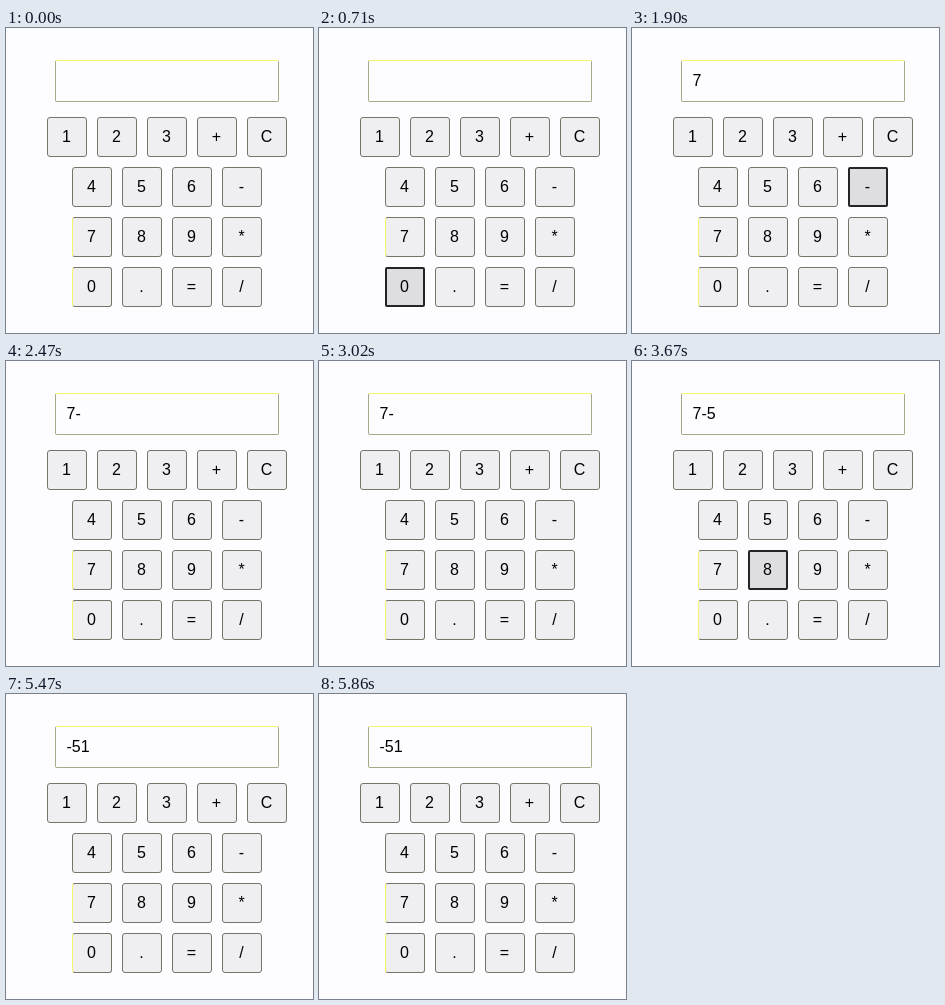
Animation, 307 px wide and 305 px high, one loop 5.98 s. Source, as an HTML page:

```html
<!DOCTYPE html>
<html lang="en">
<head>
<meta charset="utf-8">
<title>Calculator</title>
<style>
  html, body {
    margin: 0;
    width: 100%;
    height: 100%;
    overflow: hidden;
    background: #fdfdff;
  }
  body {
    position: relative;
    font: 16px "Liberation Sans", Arial, sans-serif;
    color: #000;
  }
  .display, .key { box-sizing: border-box; }
  .display {
    position: absolute;
    left: 49px;
    top: 32px;
    width: 224px;
    height: 42px;
    padding-left: 10.5px;
    line-height: 40px;
    white-space: pre;
    border: 1px solid #a8a888;
    border-top-color: #f4f46a;
    border-radius: 2px;
    background: #fdfdff;
  }
  .keys {
    position: absolute;
    left: 41px;
    top: 89px;
    width: 240px;
  }
  .row {
    display: flex;
    justify-content: center;
    gap: 10px;
    margin-bottom: 10px;
  }
  .key {
    display: flex;
    align-items: center;
    justify-content: center;
    width: 40px;
    height: 40px;
    padding-right: 1px;
    border: 1px solid #74746a;
    border-radius: 3px;
    background: #efeff2;
  }
  .edge { border-left-color: #f5f56a; }
  .key.over {
    border: 2px solid #242424;
    border-radius: 2px;
    background: #dedee2;
  }
</style>
</head>
<body>
<div class="display"></div>
<div class="keys"></div>
<script>
  const LOOP = 5980;
  const rows = ["123+C", "456-", "789*", "0.=/"];

  // [time in ms, value]; each value holds until the next time
  const typed = [
    [0, ""], [1230, "7"], [2120, "7-"], [3390, "7-5"],
    [3760, "7-58"], [4160, "-51"]
  ];
  const hovered = [
    [0, ""], [710, "0"], [900, ""], [1000, "7"], [1290, ""],
    [1350, "8"], [1430, ""], [1480, "5"], [1510, ""], [1550, "6"],
    [1800, ""], [1900, "-"], [2230, ""], [2310, "6"], [2470, ""],
    [2500, "5"], [2590, ""], [3090, "5"], [3670, "8"], [3890, ""],
    [4020, "="], [4290, ""], [4990, "="], [5440, ""], [5480, "9"],
    [5530, ""], [5570, "6"], [5620, ""], [5660, "3"], [5720, ""]
  ];

  const display = document.querySelector(".display");
  const pad = document.querySelector(".keys");
  const keys = new Map();

  function add(parent, className, text = "") {
    const el = document.createElement("div");
    el.className = className;
    el.textContent = text;
    parent.append(el);
    return el;
  }

  for (const labels of rows) {
    const row = add(pad, "row");
    for (const label of labels) {
      const edge = "70".includes(label) ? " edge" : "";
      keys.set(label, add(row, "key" + edge, label));
    }
  }

  function valueAt(track, time) {
    return track.findLast(([start]) => start <= time)[1];
  }

  function render() {
    const time = performance.now() % LOOP;
    const text = valueAt(typed, time);
    const over = valueAt(hovered, time);
    if (display.textContent !== text) display.textContent = text;
    for (const [label, el] of keys) el.classList.toggle("over", label === over);
    requestAnimationFrame(render);
  }
  render();
</script>
</body>
</html>
```
